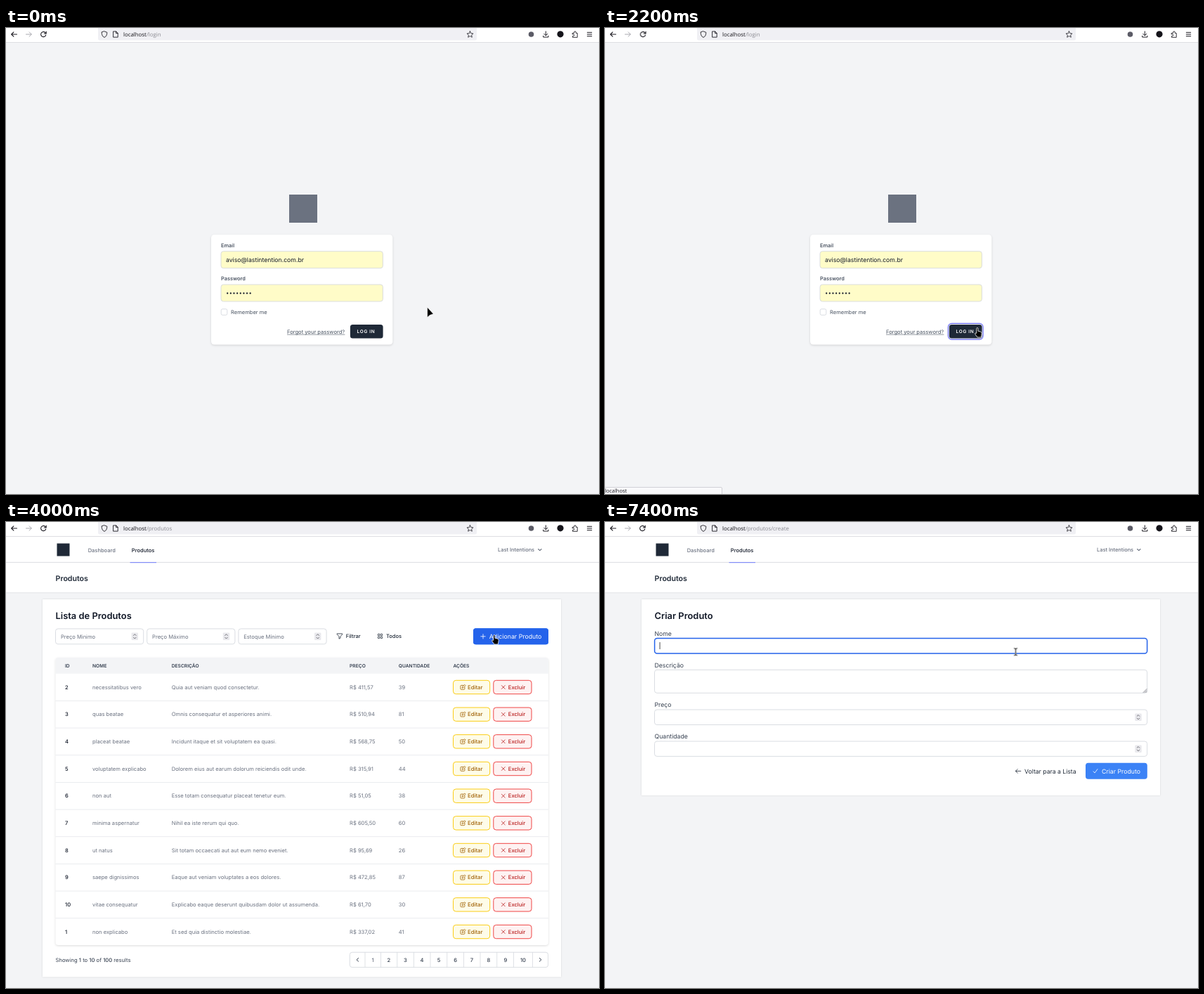
An HTML page that plays this animation: 844 px wide and 663 px high, repeating every 8 s.

```html
<!DOCTYPE html>
<html lang="pt-BR">
<head>
<meta charset="utf-8">
<title>Produtos</title>
<style>
html, body { margin: 0; width: 100%; height: 100%; overflow: hidden; background: #f3f4f6; }
svg { display: block; width: 100vw; height: 100vh; }
text { font-family: Inter, Roboto, sans-serif; text-rendering: geometricPrecision; white-space: pre; }
.ui { font-family: "Open Sans", "Noto Sans", sans-serif; }
.m { font-weight: 500; }
.b { font-weight: 600; }
.caps { letter-spacing: .1em; }
.end { text-anchor: middle; }
.line { fill: none; stroke-linecap: round; stroke-linejoin: round; }
.soft { filter: drop-shadow(0 .8px 1px #0002); }
.lift { filter: drop-shadow(0 1.6px 1.5px #00000024); }

/* every timed part shares the 8 s clock and changes in hard steps */
[data-k] { opacity: 0; animation: 8s step-end infinite; }
[data-k=login] { animation-name: login; }
[data-k=list] { animation-name: list; }
[data-k=create] { animation-name: create; }
[data-k=inner] { animation-name: inner; }
[data-k=urlList] { animation-name: urlList; }
[data-k=ring] { animation-name: ring; }
[data-k=wait] { animation-name: wait; }
[data-k=link] { animation-name: link; }
[data-k=row5] { animation-name: row5; }
[data-k=row0] { animation-name: row0; }
[data-k=hover] { animation-name: hover; }
[data-k=focus] { animation-name: focus; }
[data-k=reload] { animation-name: reload; }
[data-k=stop] { animation-name: stop; }
[data-k=arrow] { animation-name: arrow; }
[data-k=hand] { animation-name: hand; }
[data-k=beam] { animation-name: beam; }
#cursor { animation: move 8s step-end infinite; }

@keyframes login { 0% { opacity: 1 } 37.5%, 100% { opacity: 0 } }
@keyframes urlList { 0% { opacity: 0 } 37.5% { opacity: 1 } 75%, 100% { opacity: 0 } }
@keyframes list { 0% { opacity: 0 } 40% { opacity: 1 } 75%, 100% { opacity: 0 } }
@keyframes create { 0% { opacity: 0 } 75%, 100% { opacity: 1 } }
@keyframes inner { 0% { opacity: 0 } 40%, 100% { opacity: 1 } }
@keyframes ring { 0% { opacity: 0 } 25%, 100% { opacity: 1 } }
@keyframes wait { 0% { opacity: 0 } 26.25% { opacity: 1 } 40%, 100% { opacity: 0 } }
@keyframes link { 0% { opacity: 0 } 55% { opacity: 1 } 75%, 100% { opacity: 0 } }
@keyframes row5 { 0% { opacity: 1 } 46.25%, 100% { opacity: 0 } }
@keyframes row0 { 0% { opacity: 0 } 46.25% { opacity: 1 } 50%, 100% { opacity: 0 } }
@keyframes hover { 0% { opacity: 0 } 50%, 100% { opacity: 1 } }
@keyframes focus { 0% { opacity: 0 } 92.5%, 100% { opacity: 1 } }
@keyframes reload {
  0% { opacity: 1; transform: none }
  27.5% { opacity: 1; transform: translate(.7px, 0) }
  28.75% { opacity: 0; transform: none }
  42.5% { opacity: .4; transform: none }
  46.25% { opacity: 1; transform: none }
  75% { opacity: .4; transform: none }
  83.75%, 100% { opacity: 1; transform: none }
}
@keyframes stop { 0% { opacity: 0 } 28.75% { opacity: 1 } 40% { opacity: .4 } 42.5%, 100% { opacity: 0 } }
@keyframes arrow {
  0% { opacity: 1 } 21.25% { opacity: 0 } 37.5% { opacity: 1 }
  42.5% { opacity: 0 } 75% { opacity: 1 } 83.75%, 100% { opacity: 0 }
}
@keyframes hand { 0% { opacity: 0 } 21.25% { opacity: 1 } 37.5% { opacity: 0 } 46.25% { opacity: 1 } 75%, 100% { opacity: 0 } }
@keyframes beam { 0% { opacity: 0 } 42.5% { opacity: 1 } 46.25% { opacity: 0 } 83.75%, 100% { opacity: 1 } }
@keyframes move {
  0% { transform: translate(599px, 397px) }
  3.75% { transform: translate(566px, 368px) }
  5% { transform: translate(508px, 320px) }
  6.25% { transform: translate(446px, 274px) }
  7.5% { transform: translate(390px, 238px) }
  8.75% { transform: translate(344px, 217px) }
  10% { transform: translate(310px, 210px) }
  11.25% { transform: translate(282px, 215px) }
  12.5% { transform: translate(259px, 232.5px) }
  13.75% { transform: translate(247px, 328px) }
  15% { transform: translate(248px, 392px) }
  16.25% { transform: translate(276px, 450px) }
  17.5% { transform: translate(345px, 479px) }
  18.75% { transform: translate(430px, 466px) }
  20% { transform: translate(499px, 442px) }
  21.25% { transform: translate(526px, 426px) }
  37.5% { transform: translate(528.5px, 424px) }
  42.5% { transform: translate(529px, 430px) }
  46.25% { transform: translate(677px, 230px) }
  50% { transform: translate(691px, 160px) }
  55% { transform: translate(690.5px, 157.5px) }
  75% { transform: translate(693px, 156px) }
  83.75%, 100% { transform: translate(584.5px, 184.7px) }
}
</style>
</head>
<body>
<svg id="stage" viewBox="0 0 844 663" preserveAspectRatio="none"></svg>
<script>
const INK = '#111827', DARK = '#1f2937', MID = '#374151', GRAY = '#6b7280', EDGE = '#d1d5db', RULE = '#e5e7eb', BLUE = '#3b82f6';

// text is placed by the middle of its capitals
const text = (x, y, size, str, fill = GRAY, cls = '') =>
  `<text x="${x}" y="${y + size * .36}" font-size="${size}" fill="${fill}" class="${cls}">${str}</text>`;
const rect = (x, y, x2, y2, fill, r = 0, stroke = 'none', w = .8, cls = '') =>
  `<rect x="${x}" y="${y}" width="${x2 - x}" height="${y2 - y}" rx="${r}" fill="${fill}" stroke="${stroke}" stroke-width="${w}" class="${cls}"/>`;
const path = (x, y, d, stroke = DARK, w = .8) =>
  `<path class="line" transform="translate(${x} ${y})" d="${d}" stroke="${stroke}" stroke-width="${w}"/>`;
const timed = (key, body) => `<g data-k="${key}">${body}</g>`;
const field = (x, y, x2, y2, fill = '#fff') => rect(x, y, x2, y2, fill, 3.5, EDGE);
const spinner = (x, y) => rect(x - 4.7, y - 5.3, x + 4.7, y + 5.3, '#e9e9ed', 1) +
  path(x, y, 'M-1.8-1.4L0-3.2 1.8-1.4M-1.8 1.4L0 3.2 1.8 1.4', '#55555c', .8);
const cross = 'M-2.4-2.4L2.4 2.4M2.4-2.4L-2.4 2.4';
const chevron = (x, y, s) => path(x, y, `M${s} -2.4L${-s} 0 ${s} 2.4`, MID, 1);

function url(rest) {
  return `<text class="ui" x="167" y="11.6" font-size="7.85" fill="#8a8a92"><tspan fill="#15141a">localhost</tspan>/${rest}</text>`;
}

function statusBar(w, str) {
  return rect(-1, 653.5, w, 665, '#f9f9fb', 1.5, '#c8c8ce', .8) + text(0, 658.6, 7.42, str, '#15141a', 'ui');
}

function browser() {
  const c = '#1c1b22';
  return rect(0, 0, 844, 20, '#fff') + rect(0, 20, 844, 20.9, '#dcdce0') +
    rect(131, -6, 670, 17.5, '#f0f0f4', 2.5) +
    path(11.5, 9, 'M4 0H-3.8M-.6-3.2L-3.8 0-.6 3.2', c, 1.1) +
    path(32.5, 9, 'M-4 0H3.8M.6-3.2L3.8 0 .6 3.2', '#aaaab0', 1) +
    timed('reload', path(53.3, 9, 'M3.4 1A3.6 3.6 0 1 1 2.4-2.6L3.7-1.2M3.9-4V-1H1', c, 1.1)) +
    timed('stop', path(53.3, 9, 'M-3-3L3 3M3-3L-3 3', c, 1)) +
    path(140, 9, 'M0-4.2L3.8-2.8C3.8 1 2.6 3.2 0 4.4C-2.6 3.2-3.8 1-3.8-2.8Z', c, .9) +
    path(156, 9, 'M-3-4.1H.8L3.2-1.7V4.1H-3ZM.6-4V-1.5H3', c, .9) +
    path(660.5, 9, 'M0-4.4L1.3-1.4 4.5-1.1 2.1 1 2.8 4.2 0 2.5-2.8 4.2-2.1 1-4.5-1.1-1.3-1.4Z', c, .8) +
    '<circle cx="747.5" cy="9" r="3.8" fill="#5b5b66"/>' +
    path(768.3, 9, 'M0-4.2V1.6M-2.6-.8L0 1.8 2.6-.8M-3.6 2.2V4H3.6V2.2', c, 1) +
    '<circle cx="789" cy="8.8" r="4.6" fill="#15141a"/>' +
    path(810, 9.3, 'M-3.5-2H-1.4V-3.2A1.2 1.2 0 0 1 1.2-3.2V-2H3.2V4H-3.5V2.2H-2.6A1.2 1.2 0 0 0-2.6-.4H-3.5Z', c, .9) +
    path(830.5, 9, 'M-3.2-2.7H3.2M-3.2 0H3.2M-3.2 2.7H3.2', c, 1) +
    timed('login', url('login')) + timed('urlList', url('produtos')) + timed('create', url('produtos/create'));
}

function login() {
  let dots = '';
  for (let i = 0; i < 8; i++) dots += `<circle cx="${315.2 + i * 4.64}" cy="377.4" r="1.15" fill="${INK}"/>`;
  return rect(403, 237, 443, 277, GRAY) +
    rect(292, 294, 550.3, 450.5, '#fff', 4.6, 'none', 0, 'lift') +
    text(306, 309.6, 7.45, 'Email', MID, 'm') + field(306, 317.7, 536.4, 341.7, '#fffcc8') +
    text(313, 329.8, 8.69, 'aviso@lastintention.com.br', INK) +
    text(306, 356.8, 7.45, 'Password', MID, 'm') + field(306, 365, 536.4, 389, '#fffcc8') + dots +
    rect(306.2, 399.8, 314.8, 408.4, '#fff', 2, EDGE) +
    text(320, 404.2, 7.55, 'Remember me', '#4b5563') +
    text(400, 432, 7.58, 'Forgot your password?', '#4b5563') + rect(400, 435.8, 482.4, 436.4, '#4b5563') +
    timed('ring', rect(488.4, 420.4, 538.1, 443.1, '#fff', 5, '#6366f1', 1.15)) +
    rect(489.9, 421.9, 536.6, 441.5, DARK, 3.5) +
    text(499.6, 431.8, 6.5, 'LOG IN', '#fff', 'b caps');
}

function frame() {
  return rect(0, 21, 844, 57.4, '#fff') + rect(0, 57.2, 844, 58, RULE) +
    rect(0, 58, 844, 100, '#fff', 0, 'none', 0, 'soft') +
    rect(72.5, 30.5, 90.5, 48.5, DARK) +
    text(116.7, 40, 7.5, 'Dashboard', GRAY, 'm') + text(178.8, 40, 7.55, 'Produtos', INK, 'm') +
    rect(176.5, 57, 214, 58.2, '#818cf8') +
    text(700, 39.6, 7.45, 'Last Intentions', GRAY, 'm') +
    path(759.8, 39.6, 'M-2.2-1.1L0 1.1 2.2-1.1', GRAY, 1.1) +
    text(70.6, 79.8, 10.6, 'Produtos', DARK, 'b');
}

const rows = [
  [2, 'necessitatibus vero', 'Quia aut veniam quod consectetur.', '411,57', 39],
  [3, 'quas beatae', 'Omnis consequatur et asperiores animi.', '510,94', 81],
  [4, 'placeat beatae', 'Incidunt itaque et sit voluptatem ea quasi.', '568,75', 50],
  [5, 'voluptatem explicabo', 'Dolorem eius aut earum dolorum reiciendis odit unde.', '315,91', 44],
  [6, 'non aut', 'Esse totam consequatur placeat tenetur eum.', '51,05', 38],
  [7, 'minima aspernatur', 'Nihil ea iste rerum qui quo.', '605,50', 60],
  [8, 'ut natus', 'Sit totam occaecati aut aut eum nemo eveniet.', '95,69', 26],
  [9, 'saepe dignissimos', 'Eaque aut veniam voluptates a eos dolores.', '472,85', 87],
  [10, 'vitae consequatur', 'Explicabo eaque deserunt quibusdam dolor ut assumenda.', '61,70', 30],
  [1, 'non explicabo', 'Et sed quia distinctio molestiae.', '337,02', 41]
];
const cols = [84, 123, 235.7, 489, 558.8, 636.4];

function row([id, name, about, price, count], i) {
  const y = 235 + i * 38.67, top = y - 19.3;
  const hover = i === 5 || i === 0 ? timed('row' + i, rect(70.5, top, 771.8, top + 38.2, '#f9fafb')) : '';
  const cells = [name, about, 'R$ ' + price, count];
  return hover + (i ? rect(70.5, top - .4, 771.8, top + .4, RULE) : '') +
    text(cols[0], y, 7.6, id, INK, 'm') +
    cells.map((c, k) => text(cols[k + 1], y, 7.6, c)).join('') +
    rect(636.5, y - 9.7, 688.7, y + 9.7, '#fefce8', 3.8, '#facc15', 1) +
    path(650.3, y, 'M.4-2.6H-2.4Q-3.4-2.6-3.4-1.6V2.3Q-3.4 3.3-2.4 3.3H1.6Q2.6 3.3 2.6 2.3V0M-1 1L-.6-1 2.6-3.6 3.8-2.4.8.6Z', '#a16207') +
    text(657, y, 7.75, 'Editar', '#a16207', 'm') +
    rect(693.8, y - 9.7, 748, y + 9.7, '#fef2f2', 3.8, '#ef4444', 1) +
    path(707.8, y, cross, '#b91c1c') + text(714.8, y, 7.6, 'Excluir', '#b91c1c', 'm');
}

function pager() {
  const mids = [522, 544.8, 568.3, 592, 616, 639.6, 663, 687, 710.8, 736];
  const bars = [511, 533.4, 556.8, 580.3, 604, 627.8, 651.4, 675, 698.8, 722.6, 749.6];
  return text(70.5, 622.8, 7.65, 'Showing <tspan class="m">1</tspan> to <tspan class="m">10</tspan> of <tspan class="m">100</tspan> results', MID) +
    rect(489.3, 612.2, 771.6, 633.6, '#fff', 3.5, EDGE) +
    bars.map(x => rect(x - .35, 612.2, x + .35, 633.6, EDGE)).join('') +
    mids.map((x, i) => text(x, 622.8, 7.6, i + 1, i ? MID : GRAY, 'm end')).join('') +
    chevron(500.3, 622.8, 1.3) + chevron(760.6, 622.8, -1.3);
}

function list() {
  const heads = ['ID', 'NOME', 'DESCRIÇÃO', 'PREÇO', 'QUANTIDADE', 'AÇÕES'];
  const filters = ['Preço Minimo', 'Preço Máximo', 'Estoque Mínimo'];
  let tiles = '';
  for (let i = 0; i < 4; i++) {
    const x = 529.3 + (i % 2) * 3.8, y = 159.2 + (i >> 1) * 3.8;
    tiles += rect(x, y, x + 2.6, y + 2.6, 'none', .7, DARK, .8);
  }
  return rect(52, 110, 790, 647.3, '#fff', 0, 'none', 0, 'soft') +
    text(70.5, 133.2, 12.9, 'Lista de Produtos', INK, 'b') +
    filters.map((s, i) => {
      const x = 70.5 + i * 130.2;
      return field(x, 151.9, x + 125.2, 173.7) + text(x + 7.4, 162.8, 7.6, s) + spinner(x + 112.8, 162.8);
    }).join('') +
    path(475, 162.4, 'M-3.6-3.5H3.6V-2.4L1 .4V2.6L-1 3.8V.4L-3.6-2.4Z') +
    text(483.8, 162.5, 7.5, 'Filtrar', DARK, 'm') + tiles + text(541, 162.5, 7.5, 'Todos', DARK, 'm') +
    rect(665, 151.2, 772, 174.3, BLUE, 3.8) + timed('hover', rect(665, 151.2, 772, 174.3, '#2563eb', 3.8)) +
    path(679, 162.8, 'M-3.2 0H3.2M0-3.2V3.2', '#fff') + text(687.7, 163, 8.8, 'Adicionar Produto', '#fff') +
    rect(70.5, 193, 771.8, 602, '#fff', 4, 'none', 0, 'lift') +
    `<path d="M70.5 215.7V197q0-4 4-4H767.8q4 0 4 4V215.7Z" fill="#f3f4f6"/>` +
    heads.map((s, i) => text(cols[i], 204.4, 6.7, s, MID, 'b')).join('') +
    rows.map(row).join('') + pager();
}

function create() {
  const labels = [['Nome', 158.6], ['Descrição', 203.6], ['Preço', 260.2], ['Quantidade', 305.2]];
  const boxes = [[165.4, 186.9], [210.4, 243.3], [267, 288.5], [312, 333.4]];
  return rect(52, 110, 790, 389, '#fff', 0, 'none', 0, 'soft') +
    text(70.5, 133.2, 12.9, 'Criar Produto', INK, 'b') +
    labels.map(([s, y]) => text(70.5, y, 8.7, s, MID)).join('') +
    boxes.map(([a, b]) => field(70.5, a, 771.6, b)).join('') +
    path(771, 242.6, 'M-5 0L0-5M-3 0L0-3M-1 0L0-1', '#77777f', .8) +
    spinner(759, 277.7) + spinner(759, 322.7) +
    path(588, 354.4, 'M3.8 0H-3.6M-.8-2.8L-3.6 0-.8 2.8') +
    text(597, 354.6, 8.65, 'Voltar para a Lista', DARK) +
    rect(684, 342.8, 771.8, 365.8, BLUE, 3.8) + path(698, 354.4, 'M-3 .4L-1 2.6 3-2.8', '#fff') +
    text(707, 354.6, 8.73, 'Criar Produto', '#fff') +
    timed('focus', rect(70.6, 165.5, 771.6, 186.9, '#fff', 3.5, '#2563eb', 1.5) + rect(77.7, 171, 78.4, 181, '#000'));
}

function cursor() {
  const shape = (d, w) => `<path d="${d}" fill="#000" stroke="#fff" stroke-width="${w}" stroke-linejoin="round"/>`;
  const bar = 'M-2-5Q0-5 0-4Q0-5 2-5M0-4V4M-2 5Q0 5 0 4Q0 5 2 5';
  return '<g id="cursor">' +
    timed('arrow', shape('M.7.4V14.6L4.2 11.5 9.2 9.8Z', .5)) +
    timed('hand', shape('M2.8 1.6Q2.8.5 3.9.5T5 1.6V5.2L8.7 6.2Q10.4 6.7 10.2 8.6L9.3 14H4L.7 9.4Q.2 7.4 2.8 8.2Z', .8)) +
    timed('beam', path(0, 0, bar, '#fff', 2) + path(0, 0, bar, '#000', 1)) + '</g>';
}

document.getElementById('stage').innerHTML =
  rect(0, 0, 844, 663, '#f3f4f6') +
  timed('login', login()) + timed('inner', frame()) + timed('list', list()) + timed('create', create()) +
  browser() +
  timed('wait', statusBar(166.5, 'localhost')) + timed('link', statusBar(93.5, 'localhost/produtos/create')) +
  cursor();
</script>
</body>
</html>
```
